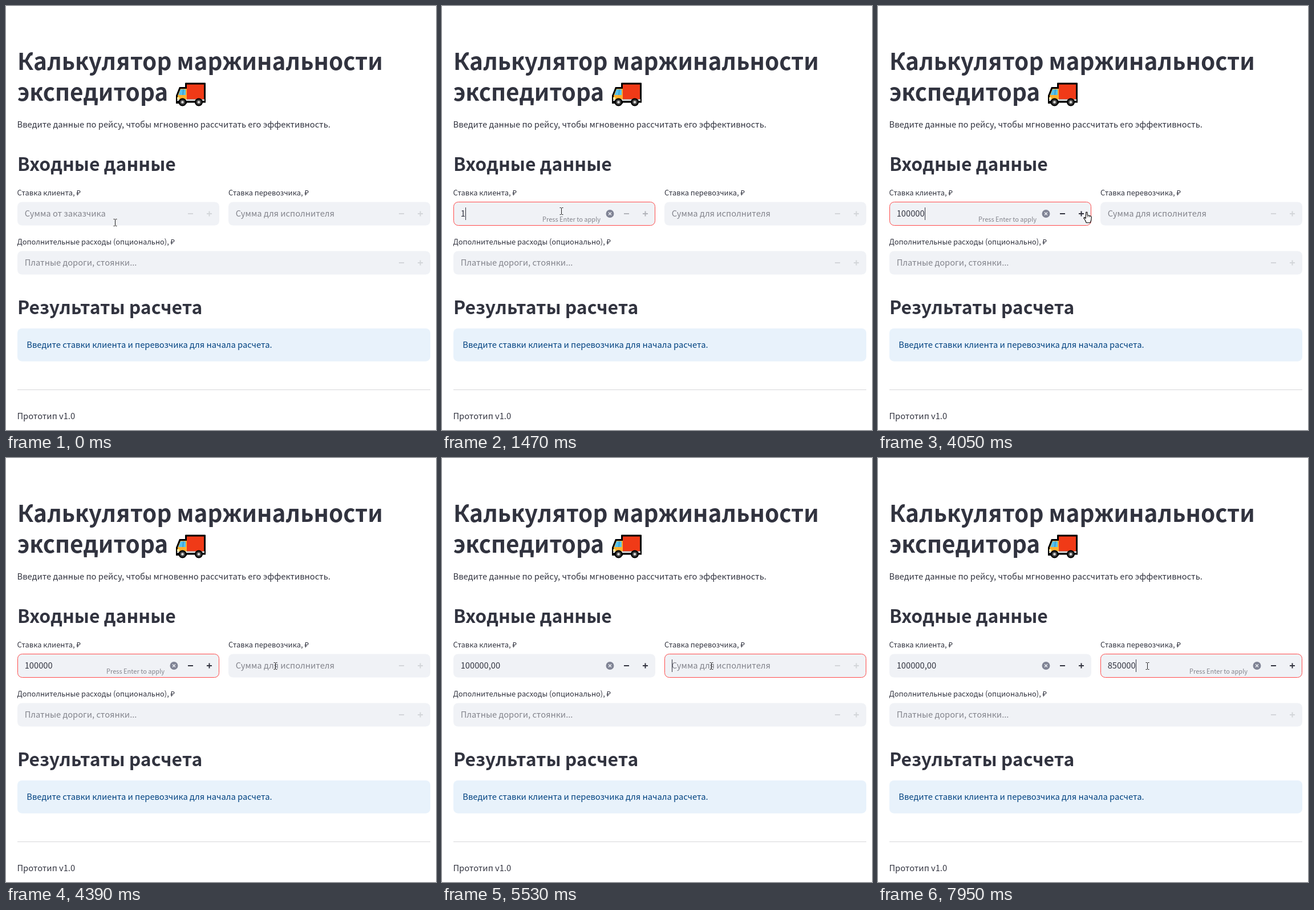
Animation, 754 px wide and 743 px high, one loop 8000 ms. Source, as an HTML page with a canvas:

```html
<!DOCTYPE html>
<html lang="ru">
<head>
<meta charset="utf-8">
<title>Калькулятор маржинальности</title>
<style>
html, body { margin: 0; width: 100%; height: 100%; overflow: hidden; background: #fff; }
canvas { display: block; width: 754px; height: 743px; }
</style>
</head>
<body>
<canvas id="stage"></canvas>
<script>
const W = 754, H = 743, LOOP = 8000;
const FONT = '"Noto Sans CJK SC", "Noto Sans CJK JP", "Noto Sans CJK KR", "Noto Sans CJK", "Noto Sans", sans-serif';
const INK = '#31333f', MUTED = '#83848c', FIELD = '#f0f2f6', RED = '#ff4b4b';
const BODY = 14.71, SMALL = BODY * 0.875, TINY = BODY * 0.75, TITLE = BODY * 2.75, HEADING = 31.9;

const canvas = document.getElementById('stage');
const ctx = canvas.getContext('2d');
const ratio = window.devicePixelRatio || 1;
canvas.width = W * ratio;
canvas.height = H * ratio;

const CLIENT = { text: '100000', keys: [1440, 1780, 2080, 2340, 2570, 2830] };
const CARRIER = { text: '850000', keys: [6220, 6520, 6980, 7310, 7510, 7950] };
const FOCUS_CLIENT = 320, FOCUS_CARRIER = 4490;

// Pointer path: time, x, y
const PATH = [
  [20, 191.5, 379.5], [120, 197, 373], [260, 208, 361.5], [590, 208.5, 361.5], [720, 209.5, 361],
  [849, 209.5, 361], [850, 209.5, 359.5], [3800, 209.5, 359.5], [3900, 270, 357],
  [4050, 366, 361], [4120, 384, 378], [4200, 420, 374], [4330, 472.5, 364]
];

const clamp = v => Math.max(0, Math.min(1, v));
const ramp = (t, start, length) => clamp((t - start) / length);
const within = (t, ...spans) => spans.some(([a, b]) => t >= a && t < b);
const typed = (entry, t) => entry.text.slice(0, entry.keys.filter(k => k <= t).length);

function text(str, x, y, size, color = INK, weight = 400, align = 'left') {
  ctx.font = `${weight} ${size}px ${FONT}`;
  ctx.fillStyle = color;
  ctx.textAlign = align;
  ctx.fillText(str, x, y);
  return ctx.measureText(str).width;
}

function box(x, y, w, h, r, fill) {
  ctx.beginPath();
  ctx.roundRect(x, y, w, h, r);
  ctx.fillStyle = fill;
  ctx.fill();
}

function poly(points, fill, stroke, width = 1) {
  ctx.beginPath();
  points.forEach(([x, y]) => ctx.lineTo(x, y));
  ctx.closePath();
  ctx.fillStyle = fill;
  ctx.fill();
  if (stroke) { ctx.strokeStyle = stroke; ctx.lineWidth = width; ctx.stroke(); }
}

function disc(x, y, r, fill) {
  ctx.beginPath();
  ctx.arc(x, y, r, 0, Math.PI * 2);
  ctx.fillStyle = fill;
  ctx.fill();
}

function line(x1, y1, x2, y2, color, width) {
  ctx.beginPath();
  ctx.moveTo(x1, y1);
  ctx.lineTo(x2, y2);
  ctx.strokeStyle = color;
  ctx.lineWidth = width;
  ctx.stroke();
}

function truck() {
  box(314, 134.5, 36, 33, 1, '#000');
  poly([[304, 142], [317, 142], [317, 171], [298, 171], [298, 157]], '#000');
  box(317, 137.5, 30, 26, 0, '#f03a17');
  poly([[306, 145], [317, 145], [317, 166], [301, 166], [301, 157]], '#ffb02e');
  poly([[306, 146], [315, 146], [315, 156], [302.5, 156]], '#55c2ee');
  line(311, 146, 310, 156, '#2a86b8', 1);
  box(300, 163.5, 48, 3, 0, '#e6e6e6');
  box(300, 160, 4, 3, 0, '#fff1a8');
  box(298, 166.5, 52, 3, 0, '#000');
  for (const x of [309.5, 338]) {
    disc(x, 168.5, 7, '#000');
    disc(x, 168.5, 4.8, '#404040');
    disc(x, 168.5, 2.3, '#d8d8d8');
  }
}

function field(x, y, w, s) {
  const right = x + w, mid = y + 20.5, baseline = y + 25.5;
  box(x, y, w, 41, 8, FIELD);
  if (s.focus > 0) {
    ctx.globalAlpha = s.focus;
    ctx.beginPath();
    ctx.roundRect(x + 0.5, y, w - 1, 41, 8);
    ctx.strokeStyle = RED;
    ctx.lineWidth = 1;
    ctx.stroke();
    ctx.globalAlpha = 1;
  }
  let end = 0;
  if (s.value) end = text(s.value, x + 12.7, baseline, BODY);
  else text(s.placeholder, x + 12.7, baseline, BODY, MUTED);
  if (s.caret) {
    ctx.fillStyle = INK;
    ctx.fillRect(Math.round(x + 12.9 + end), y + 9.5, 1, 22);
  }
  if (s.hint) text('Press Enter to apply', right - 96, y + 34.5, TINY, MUTED, 400, 'right');
  if (s.value) {
    disc(right - 79.5, mid, 7, '#808495');
    line(right - 82, mid - 2.5, right - 77, mid + 2.5, FIELD, 1.3);
    line(right - 77, mid - 2.5, right - 82, mid + 2.5, FIELD, 1.3);
  }
  const button = `rgba(49,51,63,${0.15 + 0.85 * (s.active || 0)})`;
  line(right - 55, mid, right - 46, mid, button, 2);
  ctx.beginPath();
  ctx.rect(right - 22, mid - 1, 9, 2);
  ctx.rect(right - 18.5, mid - 4.5, 2, 3.5);
  ctx.rect(right - 18.5, mid + 1, 2, 3.5);
  ctx.fillStyle = button;
  ctx.fill();
}

function beam(x, y) {
  const c = '#222';
  line(x, y - 5.5, x, y + 5.5, c, 1);
  for (const d of [-6, 6]) {
    line(x - 3, y + d, x - 0.7, y + d, c, 1);
    line(x + 0.7, y + d, x + 3, y + d, c, 1);
  }
}

function arrow(x, y) {
  poly([[x, y], [x, y + 17], [x + 4, y + 13.3], [x + 6.5, y + 19], [x + 9, y + 18],
    [x + 6.5, y + 12.3], [x + 12, y + 12]], '#fff', '#000', 1);
}

function hand(x, y) {
  ctx.lineJoin = 'round';
  poly([[x - 1.5, y], [x + 0.5, y], [x + 1, y + 5.5], [x + 4, y + 6], [x + 7, y + 7],
    [x + 8, y + 9], [x + 7.5, y + 14], [x + 6, y + 18.5], [x - 1, y + 18.5], [x - 3, y + 14],
    [x - 5.5, y + 10.5], [x - 4.5, y + 9], [x - 2, y + 11]], '#fff', '#000', 1.1);
  line(x + 1.5, y + 6, x + 1.5, y + 9, '#000', 0.8);
  line(x + 4.5, y + 6.5, x + 4.5, y + 9, '#000', 0.8);
  ctx.lineJoin = 'miter';
}

function pointer(t) {
  let i = PATH.findIndex(p => p[0] > t);
  if (i < 0) i = PATH.length;
  const a = PATH[Math.max(0, i - 1)], b = PATH[Math.min(i, PATH.length - 1)];
  const k = b[0] > a[0] ? ramp(t, a[0], b[0] - a[0]) : 0;
  const x = a[1] + (b[1] - a[1]) * k, y = a[2] + (b[2] - a[2]) * k;
  if (x > 311 && x < 374) hand(x, y);
  else if (x >= 374 && x < 390) arrow(x, y);
  else beam(Math.floor(x) + 0.5, Math.floor(y) + 0.5);
}

function draw(t) {
  ctx.setTransform(ratio, 0, 0, ratio, 0, 0);
  ctx.fillStyle = '#fff';
  ctx.fillRect(0, 0, W, H);

  text('Калькулятор маржинальности', 20, 112, TITLE, INK, 700);
  text('экспедитора', 20, 166, TITLE, INK, 700);
  truck();
  text('Введите данные по рейсу, чтобы мгновенно рассчитать его эффективность.', 19.5, 213, BODY);
  text('Входные данные', 20, 289, HEADING, INK, 600);
  text('Ставка клиента, ₽', 19.5, 332, SMALL);
  text('Ставка перевозчика, ₽', 390, 332, SMALL);
  text('Дополнительные расходы (опционально), ₽', 19.5, 418, SMALL);

  const left = t >= FOCUS_CARRIER;
  field(20, 343.5, 354, {
    placeholder: 'Сумма от заказчика',
    value: typed(CLIENT, t) + (left ? ',00' : ''),
    focus: ramp(t, FOCUS_CLIENT, 100) - ramp(t, FOCUS_CARRIER, 90),
    caret: within(t, [FOCUS_CLIENT, 850], [1380, 3370], [3900, 4390]),
    hint: t >= CLIENT.keys[0] && !left,
    active: ramp(t, CLIENT.keys[0], 150)
  });
  field(390, 343.5, 354, {
    placeholder: 'Сумма для исполнителя',
    value: typed(CARRIER, t),
    focus: ramp(t, FOCUS_CARRIER, 90),
    caret: within(t, [FOCUS_CARRIER, 5000], [5530, 6060], [CARRIER.keys[0], LOOP]),
    hint: t >= CARRIER.keys[0],
    active: ramp(t, CARRIER.keys[0], 150)
  });
  field(20, 429.5, 724, { placeholder: 'Платные дороги, стоянки...' });

  text('Результаты расчета', 20, 540, HEADING, INK, 600);
  box(20, 565, 724, 57.7, 8, '#e8f2fb');
  text('Введите ставки клиента и перевозчика для начала расчета.', 36.3, 599, BODY, '#004280');
  line(20, 672.5, 744, 672.5, '#d6d6d9', 1);
  text('Прототип v1.0', 19.5, 724, BODY);
  pointer(t);
}

const start = performance.now();
function tick() {
  draw((performance.now() - start) % LOOP);
  requestAnimationFrame(tick);
}
tick();
</script>
</body>
</html>
```
